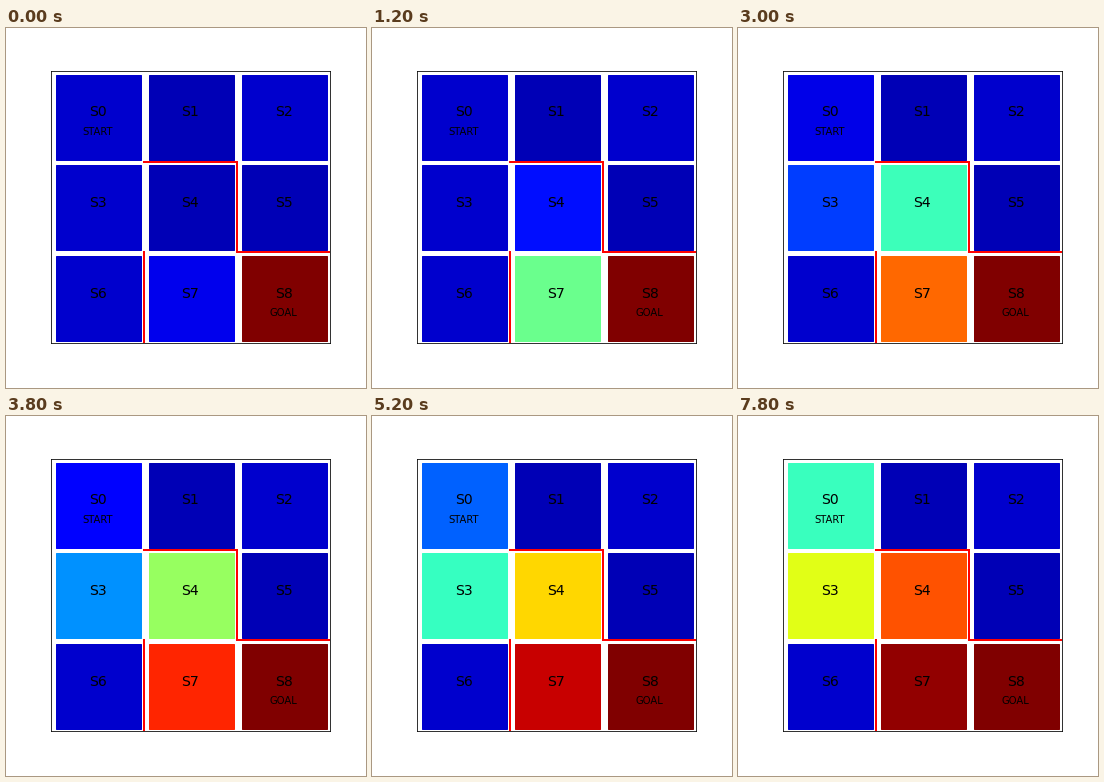
Animation, 360 px wide and 360 px high, one loop 8000 ms. Source, as a matplotlib script:

```python
import numpy as np
import matplotlib.pyplot as plt
from matplotlib import cm
from matplotlib.animation import FuncAnimation

FRAMES, INTERVAL = 40, 200
ETA, GAMMA = 0.1, 0.9
GOAL = 8
PATH = [0, 3, 4, 7]
# values of the best other action per state, and of the action on the path
START_V = np.array([0.07, 0.047, 0.07, 0.07, 0.047, 0.047, 0.07, 0.097, 1.0])
START_Q = [0.07, 0.07, 0.047, 0.02]


def learn():
    """State values per episode, learning along the path to the goal."""
    q = np.array(START_Q)
    history = []
    for _ in range(FRAMES):
        v = START_V.copy()
        v[PATH] = np.maximum(v[PATH], q)
        history.append(v)
        target = GAMMA * v[PATH[1:] + [GOAL]]
        target[-1] = 1.0
        q = q + ETA * (target - q)
    return history


def center(state):
    return state % 3 + 0.5, 2.5 - state // 3


values = learn()

fig = plt.figure(figsize=(5, 5), dpi=72, facecolor="white")
fig.subplots_adjust(left=0.125, right=0.9, bottom=0.125, top=0.88)
ax = fig.add_subplot()
ax.set(xlim=(0, 3), ylim=(0, 3), xticks=[], yticks=[])

walls = [((1, 1), (0, 1)), ((1, 2), (2, 2)), ((2, 2), (2, 1)), ((2, 3), (1, 1))]
for xs, ys in walls:
    ax.plot(xs, ys, color="red", linewidth=2)

cells = []
for s in range(9):
    x, y = center(s)
    cells += ax.plot([x], [y], marker="s", markersize=85, color=cm.jet(values[0][s]))
    ax.text(x, y, f"S{s}", size=14, ha="center")

for s, label in ((0, "START"), (GOAL, "GOAL")):
    x, y = center(s)
    ax.text(x, y - 0.2, label, size=10, ha="center")


def draw(i):
    for cell, v in zip(cells, values[i]):
        cell.set_color(cm.jet(float(v)))
    return cells


anim = FuncAnimation(fig, draw, frames=FRAMES, interval=INTERVAL,
                     repeat=True, repeat_delay=0, blit=False)
plt.show()
```
